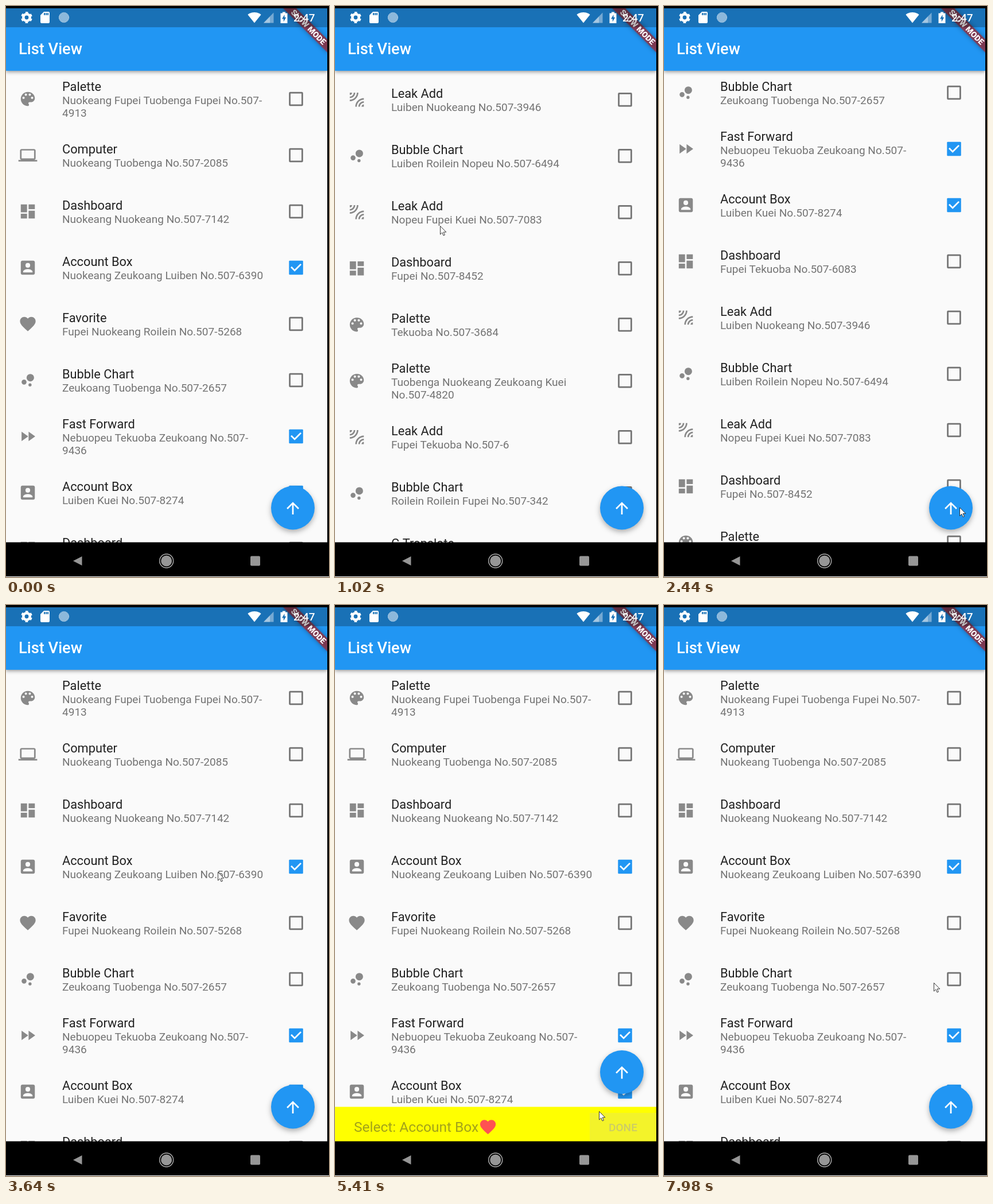
These frames come from a looping animation (563 px wide and 995 px high, 8 s). An HTML page:

```html
<!DOCTYPE html>
<html lang="en">
<head>
<meta charset="utf-8">
<title>List View</title>
<style>
  html, body { margin: 0; width: 100%; height: 100%; overflow: hidden; background: #000; }
  svg { display: block; width: 100vw; height: 100vh; font-family: Roboto, sans-serif; }
  .title { font-size: 21.78px; fill: rgba(0,0,0,.87); }
  .sub { font-size: 19.06px; fill: rgba(0,0,0,.54); }
  .icon { fill: rgba(0,0,0,.45); fill-rule: evenodd; }
  .box { fill: none; stroke: rgba(0,0,0,.54); stroke-width: 2.72; }
  .tick { fill: none; stroke: #fff; stroke-width: 2.72; }
  .bar { filter: drop-shadow(0 2.5px 3px rgba(0,0,0,.4)); }
  .fab { filter: drop-shadow(0 4.5px 5px rgba(0,0,0,.3)); }
  .band { filter: drop-shadow(0 0 4px rgba(0,0,0,.5)); }
</style>
</head>
<body>
<svg viewBox="0 0 563 995" preserveAspectRatio="none">
  <defs>
    <clipPath id="rowClip"><rect id="rowRect" width="560" height="98"/></clipPath>
    <clipPath id="doneClip"><rect x="444" y="10.5" width="116" height="49"/></clipPath>
  </defs>
  <rect width="560" height="995" fill="#fafafa"/>
  <g clip-path="url(#rowClip)"><circle id="ripple" fill="#c8c8c8"/></g>
  <g id="list"></g>

  <g id="snack">
    <rect width="560" height="70" fill="#ff0"/>
    <g id="content">
      <g clip-path="url(#doneClip)"><circle id="doneRipple" cx="502" cy="38" fill="#c8c8c8"/></g>
      <text id="label" x="33" y="43.8" font-size="24.5" fill="#a2a21a"></text>
      <path id="heart" fill="#ff5252"/>
      <text id="done" x="477" y="42.3" font-size="19.06" font-weight="500">DONE</text>
    </g>
  </g>

  <g id="fab">
    <circle class="fab" cx="500" cy="874.5" r="38" fill="#2196f3"/>
    <path transform="translate(483.7 858.7) scale(1.361)" fill="#fff"
      d="M4 12l1.41 1.41L11 7.83V20h2V7.83l5.58 5.59L20 12l-8-8-8 8z"/>
  </g>

  <rect class="bar" y="4" width="560" height="108.9" fill="#2196f3"/>
  <text x="22" y="84" font-size="27.2" font-weight="500" fill="#fff">List View</text>

  <g transform="translate(560 4) rotate(45)">
    <rect class="band" x="-54.4" y="38.1" width="108.9" height="16.3" fill="#b71c1c" fill-opacity=".63"/>
    <text y="51.2" font-size="13.9" font-weight="900" fill="#fff" text-anchor="middle">SLOW MODE</text>
  </g>

  <rect y="4" width="560" height="33" fill="#000" fill-opacity=".25"/>
  <g fill="none" stroke="#fff">
    <circle cx="36" cy="20" r="5.7" stroke-width="4.6"/>
    <circle cx="36" cy="20" r="8.6" stroke-width="2.8" stroke-dasharray="4.5 4.506" stroke-dashoffset="-2.25"/>
    <circle cx="101" cy="20" r="8.6" fill="#fff" fill-opacity=".5" stroke-opacity=".7" stroke-dasharray="2 1"/>
  </g>
  <g fill="#fff">
    <path transform="translate(56 8)" d="M18 2h-8L4 8v12c0 1.1.9 2 2 2h12c1.1 0 2-.9 2-2V4c0-1.1-.9-2-2-2zm-6 6h-2V4h2v4zm3 0h-2V4h2v4zm3 0h-2V4h2v4z"/>
    <path transform="translate(421 8)" d="M12 21.5L23.64 7C23.2 6.66 18.7 3 12 3S.81 6.66.36 7z"/>
    <path d="M449 29.5h17.5V11.5z" fill-opacity=".4"/>
    <path d="M449 29.5h11V18.2z" fill-opacity=".35"/>
    <path fill-rule="evenodd" d="M478.5 12.5h3.5v-2h5v2h3.5v17.5h-12zM485.5 15l-4.5 7.5h2.8v5l4.5-7.8h-2.8z"/>
    <text x="501" y="27" font-size="19.06" font-weight="500">2:47</text>
  </g>

  <rect y="934.5" width="563" height="59.5" fill="#000"/>
  <g fill="#969696">
    <path d="M117 967l15.5-8v16z"/>
    <circle cx="279.7" cy="967" r="9.5"/>
    <circle cx="279.7" cy="967" r="12" fill="none" stroke="#b0b0b0" stroke-width="1.4"/>
    <rect x="426" y="958.5" width="17" height="17" rx="2"/>
  </g>
  <path d="M0 0h563v994h-3V4H0z"/>
  <rect y="994" width="563" height="1" fill="#fff"/>
  <path id="cursor" fill="#fff" stroke="#222" stroke-width=".9" stroke-linejoin="round"
    d="M.5.5v14.5l3.3-3.2 2.3 5.2 2.3-1-2.3-5h4.7z"/>
</svg>
<script>
const $ = id => document.getElementById(id);
const ROW = 98, TOP = 113, MAX_SCROLL = 942.5, SNACK = 60.5, S = 1.361;

const dot = (x, y, r) => `M${x - r} ${y}a${r} ${r} 0 1 0 ${2 * r} 0a${r} ${r} 0 1 0 ${-2 * r} 0z`;
const HEART = 'M12 21.35l-1.45-1.32C5.4 15.36 2 12.28 2 8.5 2 5.42 4.42 3 7.5 3c1.74 0 3.41.81 4.5 2.09C13.09 3.81 14.76 3 16.5 3 19.58 3 22 5.42 22 8.5c0 3.78-3.4 6.86-8.55 11.54z';
const icons = {
  'Palette': 'M12 3c-4.97 0-9 4.03-9 9s4.03 9 9 9c.83 0 1.5-.67 1.5-1.5 0-.39-.15-.74-.39-1.01-.23-.26-.38-.61-.38-.99 0-.83.67-1.5 1.5-1.5H16c2.76 0 5-2.24 5-5 0-4.42-4.03-8-9-8z'
    + dot(6.5, 10.5, 1.5) + dot(9.5, 6.5, 1.5) + dot(14.5, 6.5, 1.5) + dot(17.5, 10.5, 1.5),
  'Computer': 'M20 18c1.1 0 2-.9 2-2V6c0-1.1-.9-2-2-2H4c-1.1 0-2 .9-2 2v10c0 1.1.9 2 2 2H0v2h24v-2zM4 6h16v10H4z',
  'Dashboard': 'M3 13h8V3H3zm0 8h8v-6H3zm10 0h8V11h-8zm0-18v6h8V3z',
  'Account Box': 'M3 5v14c0 1.1.9 2 2 2h14c1.1 0 2-.9 2-2V5c0-1.1-.9-2-2-2H5c-1.1 0-2 .9-2 2z' + dot(12, 9, 3)
    + 'M6 17c0-2 4-3.1 6-3.1s6 1.1 6 3.1v1H6z',
  'Favorite': HEART,
  'Bubble Chart': dot(7.2, 14.4, 3.2) + dot(14.8, 18, 2) + dot(15.2, 8.8, 4.8),
  'Fast Forward': 'M4 18l8.5-6L4 6zm9-12v12l8.5-6z',
  'Leak Add': 'M6 3H3v3c1.66 0 3-1.34 3-3zm8 0h-2c0 4.97-4.03 9-9 9v2c6.08 0 11-4.93 11-11zm-4 0H8c0 2.76-2.24 5-5 5v2c3.87 0 7-3.13 7-7zm0 18h2c0-4.97 4.03-9 9-9v-2c-6.07 0-11 4.93-11 11zm8 0h3v-3c-1.66 0-3 1.34-3 3zm-4 0h2c0-2.76 2.24-5 5-5v-2c-3.87 0-7 3.13-7 7z',
  'G Translate': 'M3 3h18v18H3z'
};
// title, address (| breaks the line), checked
const rows = [
  ['Palette', 'Nuokeang Fupei Tuobenga Fupei No.507-|4913'],
  ['Computer', 'Nuokeang Tuobenga No.507-2085'],
  ['Dashboard', 'Nuokeang Nuokeang No.507-7142'],
  ['Account Box', 'Nuokeang Zeukoang Luiben No.507-6390', 1],
  ['Favorite', 'Fupei Nuokeang Roilein No.507-5268'],
  ['Bubble Chart', 'Zeukoang Tuobenga No.507-2657'],
  ['Fast Forward', 'Nebuopeu Tekuoba Zeukoang No.507-|9436', 1],
  ['Account Box', 'Luiben Kuei No.507-8274', 1],
  ['Dashboard', 'Fupei Tekuoba No.507-6083'],
  ['Leak Add', 'Luiben Nuokeang No.507-3946'],
  ['Bubble Chart', 'Luiben Roilein Nopeu No.507-6494'],
  ['Leak Add', 'Nopeu Fupei Kuei No.507-7083'],
  ['Dashboard', 'Fupei No.507-8452'],
  ['Palette', 'Tekuoba No.507-3684'],
  ['Palette', 'Tuobenga Nuokeang Zeukoang Kuei|No.507-4820'],
  ['Leak Add', 'Fupei Tekuoba No.507-6'],
  ['Bubble Chart', 'Roilein Roilein Fupei No.507-342'],
  ['G Translate', 'Roilein Nopeu No.507-2973']
];

$('list').innerHTML = rows.map(([name, address, checked], i) => {
  const lines = address.split('|'), y = 45.5 - 11 * (lines.length - 1);
  const check = checked
    ? '<rect x="493.3" y="36.8" width="24.5" height="24.5" rx="1.4" fill="#2196f3"/><path class="tick" d="M497 47.8l6.1 6.1 11-11"/>'
    : '<rect class="box" x="494.6" y="38.1" width="21.8" height="21.8" rx=".7"/>';
  return `<g transform="translate(0 ${TOP + i * ROW})">
    <path class="icon" transform="translate(21.7 32.7) scale(${S})" d="${icons[name]}"/>
    <text class="title" x="98" y="${y}">${name}</text>
    ${lines.map((s, n) => `<text class="sub" x="98" y="${y + 23.5 + 22 * n}">${s}</text>`).join('')}
    ${check}</g>`;
}).join('');
$('heart').setAttribute('d', HEART);

const clamp = x => Math.min(1, Math.max(0, x));
const part = (t, a, b) => clamp((t - a) / (b - a));
const smooth = x => x * x * (3 - 2 * x);

// cubic-bezier(.4, 0, .2, 1)
function fastOutSlowIn(x) {
  let lo = 0, hi = 1;
  for (let i = 0; i < 20; i++) {
    const u = (lo + hi) / 2, v = 1 - u;
    if (1.2 * v * v * u + .6 * v * u * u + u * u * u < x) lo = u; else hi = u;
  }
  return lo * lo * (3 - 2 * lo);
}

// time, x, y of the pointer tip
const path = [
  [310, 28, 713], [540, 118, 690], [690, 118, 690], [860, 183, 383], [1070, 183, 383],
  [1470, 296, 747], [1500, 296, 747], [1530, 324, 799], [1660, 324, 799], [1900, 515, 875], [2690, 515, 873],
  [2990, 492, 342], [3140, 492, 342], [3640, 369, 465], [4100, 369, 465], [4660, 321, 868],
  [4720, 321, 868], [4900, 440, 925], [5040, 500, 912], [5290, 500, 912], [5410, 460, 882],
  [6090, 468, 370], [6120, 468, 370], [6380, 412, 371], [6750, 412, 371], [7310, 431, 902],
  [7340, 431, 902], [7530, 477, 895], [7740, 477, 895], [7980, 470, 658], [8000, 470, 658]
];
function pointer(t) {
  const i = path.findIndex(p => p[0] > t);
  const a = path[i - 1], b = path[i], k = smooth(part(t, a[0], b[0]));
  return [a[1] + (b[1] - a[1]) * k, a[2] + (b[2] - a[2]) * k];
}

// drag, fling to the end, then the jump back to the top
function scroll(t) {
  const drag = 307 * part(t, 690, 860) ** 2;
  const fling = (MAX_SCROLL - 307) * (1 - (1 - part(t, 860, 1158)) ** 3);
  return (drag + fling) * (1 - smooth(part(t, 2350, 2540)));
}

const taps = [
  { row: 3, x: 369, y: 465, at: 3873, done: 5280, exit: 5420 },
  { row: 2, x: 412, y: 371, at: 6513, done: 7715, exit: 7735 }
];

function setRipple(el, dt, speed) {
  const on = dt >= 0 && dt < 280;
  el.setAttribute('r', on ? 10 + speed * dt : 0);
  el.setAttribute('fill-opacity', on ? .4 * (1 - dt / 280) : 0);
}

function draw(now) {
  const t = now % 8000;
  $('list').setAttribute('transform', `translate(0 ${-scroll(t)})`);

  const tap = taps[t < taps[1].at ? 0 : 1];
  const name = rows[tap.row][0];
  $('rowRect').setAttribute('y', TOP + tap.row * ROW);
  $('ripple').setAttribute('cx', tap.x);
  $('ripple').setAttribute('cy', tap.y);
  setRipple($('ripple'), t - tap.at, 1.09);
  setRipple($('doneRipple'), t - tap.done, .7);

  const enter = part(t, tap.at, tap.at + 250), exit = part(t, tap.exit, tap.exit + 235);
  const h = SNACK * fastOutSlowIn(exit ? 1 - exit : enter);
  $('snack').setAttribute('transform', `translate(0 ${935 - h})`);
  $('fab').setAttribute('transform', `translate(0 ${-h})`);
  $('content').setAttribute('opacity', fastOutSlowIn(part(enter, .72, 1)));
  $('label').textContent = 'Select: ' + name;
  $('heart').setAttribute('transform', `translate(${33 + $('label').getComputedTextLength()} 18.7) scale(${S})`);
  $('done').setAttribute('fill', t < tap.done ? '#2196f3' : '#cccc66');

  const seen = t >= 310;
  $('cursor').setAttribute('visibility', seen ? 'visible' : 'hidden');
  if (seen) $('cursor').setAttribute('transform', `translate(${pointer(t)})`);
  requestAnimationFrame(draw);
}
draw(0);
</script>
</body>
</html>
```
